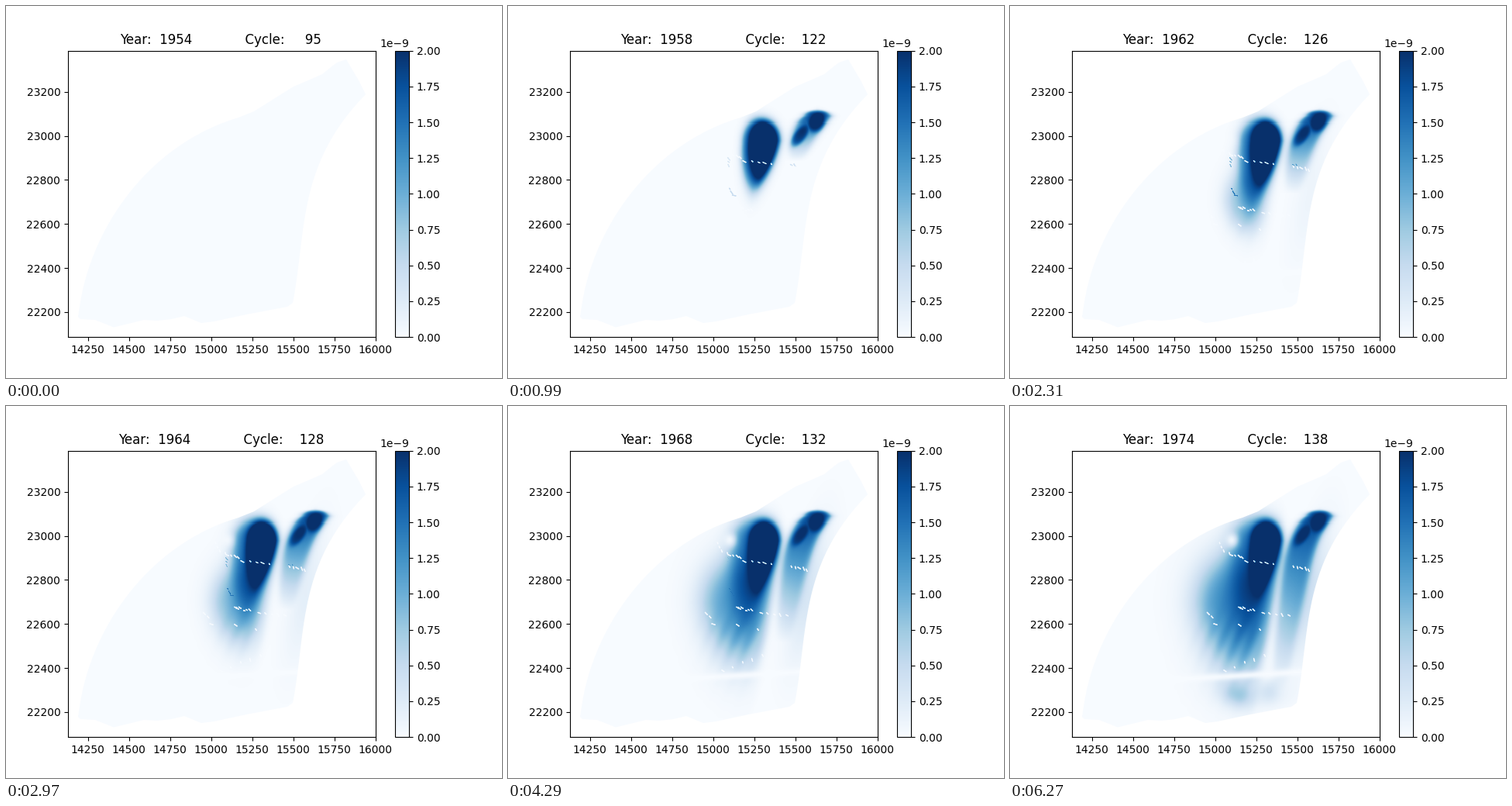
Recreate the animation shown at these times as a matplotlib script. Size 640 by 480 pixels, loop 6600 ms.

```python
import numpy as np
import matplotlib.pyplot as plt
from matplotlib.animation import FuncAnimation
from matplotlib.patches import Polygon

FRAMES, INTERVAL = 20, 330
X0, X1, Y0, Y1 = 14128.2, 16000.2, 22086.3, 23387.3
LEFT, RIGHT, TOP, BOTTOM = 80, 476.8, 57.6, 427.2
SAT = 2.6

# Field sampled on the screen pixels covered by the axes, y down
gx = np.arange(80, 478) + 0.5
gy = np.arange(57, 428) + 0.5
X, Y = np.meshgrid(gx, gy)
rng = np.random.default_rng(4)


def to_data(px, py):
    return (X0 + (px - LEFT) / (RIGHT - LEFT) * (X1 - X0),
            Y1 - (py - TOP) / (BOTTOM - TOP) * (Y1 - Y0))


def bezier(a, b, c, d, n=30):
    t = np.linspace(0, 1, n)[:, None]
    a, b, c, d = map(np.array, (a, b, c, d))
    return list((1 - t) ** 3 * a + 3 * t * (1 - t) ** 2 * b
                + 3 * t * t * (1 - t) * c + t ** 3 * d)


def outline():
    west = bezier((95, 388), (110, 285), (185, 178), (300, 144))
    north = [(320, 136), (371, 104), (390, 96), (408, 88), (418, 80),
             (427, 73), (439, 69), (455, 96)]
    east = bezier((464, 114), (375, 205), (388, 290), (370, 383))
    south = [(363, 388), (310, 398), (268, 407), (252, 409), (230, 400),
             (213, 404), (195, 406), (178, 405), (139, 414.5), (115, 405),
             (96, 404), (93, 401)]
    return west + north + east + south


def sig(v):
    return 1 / (1 + np.exp(-np.clip(v, -40, 40)))


def lerp(a, b, t):
    return a + (b - a) * t


def egg(cx, cy, rx, up, down, lean=0, p=2):
    """Radius measure of an egg whose lower part leans and tapers."""
    dy = Y - cy
    u = np.abs(dy) / np.where(dy < 0, up, down)
    v = np.abs(X - cx - lean * np.maximum(dy, 0)) / rx
    p = np.where(dy < 0, 2, p)
    return (u ** p + v ** p) ** (1 / p)


def polar(cx, cy, rx, ry, tilt):
    """Elliptical radius; the ry axis leans right by tilt degrees."""
    a = np.radians(tilt)
    u = (X - cx) * np.sin(a) - (Y - cy) * np.cos(a)
    v = (X - cx) * np.cos(a) + (Y - cy) * np.sin(a)
    return np.hypot(v / rx, u / ry)


def glow(*ellipse):
    return np.exp(-polar(*ellipse) ** 2)


def dashes(start, end, n):
    """Mask of n short strokes scattered along a line."""
    mask = np.zeros_like(X)
    for t in np.linspace(0, 1, n):
        x, y = lerp(np.array(start), np.array(end), t) + rng.normal(0, .7, 2)
        angle, half = rng.uniform(.2, 1.3), rng.uniform(.6, 2.2)
        c, s = np.cos(angle), np.sin(angle)
        along = np.clip((X - x) * c + (Y - y) * s, -half, half)
        d = np.hypot(X - x - along * c, Y - y - along * s)
        mask = np.maximum(mask, np.exp(-(d / .9) ** 4))
    return mask


def union(*parts):
    rest = 1
    for part in parts:
        rest = rest * (1 - np.clip(part / SAT, 0, 1))
    return SAT * (1 - rest)


GAPS = sum(dashes(*run) for run in [
    ((271, 177), (277, 187), 3), ((283, 190), (299, 197), 5),
    ((306, 200), (340, 204), 5), ((366, 207), (386, 211), 5),
    ((295, 260), (315, 264), 6), ((326, 267), (360, 270), 5),
    ((256, 267), (265, 280), 3), ((277, 341), (328, 322), 5),
    ((297, 283), (322, 289), 2)]).clip(0, 1)
FLECKS = (.9 * dashes((285, 197), (284, 206), 3)
          + 1.5 * dashes((286, 238), (291, 244), 3)
          + 1.2 * dashes((365, 206), (370, 205), 2))
SLIT = 353 - .19 * np.maximum(Y - 195, 0)
WEST_SIDE = sig((SLIT - X) / 3)
STREAKS = 1 + .08 * np.sin((X + .42 * Y) / 3) * sig((Y - 285) / 10)
SEAM = np.exp(-((Y - 349 + (X - 280) * .06) / 5) ** 2)
HOLE = np.exp(-polar(286, 173, 8, 9, 0) ** 2)
HEADS = sig(6 * (1 - np.minimum(polar(398, 151, 9.5, 12, 35),
                                polar(377, 167, 7, 15, 37))))
SHORE = glow(388, 245, 20, 80, 12)
BASIN = (.5 * glow(293, 373, 20, 15, 20) + .26 * glow(335, 368, 14, 16, 10)
         + .12 * glow(318, 372, 46, 18, 0))


def east_plume(length):
    """Slanted plume fading linearly from its head down to its tip."""
    d = np.maximum(Y, 143) - 150
    axis = 393 - 16 * (1 - np.exp(-d / 25)) - .14 * d
    s = np.clip((Y - 140) / length, 0, 1)
    cap = np.sqrt(np.clip(1 - (np.maximum(150 - Y, 0) / 16) ** 2, 0, 1))
    half = 19 * (1 - .6 * s ** 2) * cap
    return (1.85 * (1 - s) * sig((half - np.abs(X - axis)) / 2.6)
            * sig((Y - 136) / 1.2))


def field(k):
    if k == 0:
        return np.zeros_like(X)
    g = (k - 2) / 17
    ease = 1 - (1 - g) ** 2
    late = np.clip((k - 5) / 14, 0, 1)
    spread = 1 - (1 - late) ** 2

    core = 2.4 * sig(8 * (1 - egg(331, 174, 20, 26, lerp(50, 66, ease),
                                  -.14, 1.6)))
    halo = 1.5 * sig(lerp(9, 4.5, ease) * (1 - egg(
        lerp(322, 319, ease), 178, lerp(18, 31, ease), 31,
        lerp(52, 105, ease), -.1, 1.7)))
    south = 1.35 * late ** .3 * sig(4 * (1 - egg(
        lerp(306, 290, spread), lerp(250, 256, spread), lerp(14, 46, spread),
        lerp(25, 58, spread), lerp(20, 80, spread), .08)))
    c = union(core, halo * WEST_SIDE, south * WEST_SIDE * STREAKS,
              east_plume(lerp(50, 228, g)), HEADS * lerp(1.6, 1.1, ease),
              SHORE * .38 * spread, BASIN * np.clip((k - 14) / 5, 0, 1))
    c = c * (1 - .92 * SEAM) * (1 - .9 * HOLE * min(1, 3 * late))
    c = np.maximum(c, FLECKS * np.clip((k - 2) / 3, 0, 1))
    return c * (1 - .9 * GAPS)


def heading(k):
    year = 1955 + k if k else 1954
    cycle = 95 if k == 0 else (118 if k < 3 else 119) + k
    return f"Year:  {year}" + " " * 13 + f"Cycle:{cycle:7d}"


fig, ax = plt.subplots(figsize=(6.4, 4.8), dpi=100)
ex0, ey1 = to_data(gx[0] - .5, gy[0] - .5)
ex1, ey0 = to_data(gx[-1] + .5, gy[-1] + .5)
im = ax.imshow(field(0), cmap="Blues", vmin=0, vmax=2e-9, aspect="auto",
               extent=(ex0, ex1, ey0, ey1), interpolation="nearest")
im.set_clip_path(Polygon([to_data(*p) for p in outline()],
                         transform=ax.transData))
fig.colorbar(im)
ax.set_xlim(X0, X1)
ax.set_ylim(Y0, Y1)
title = ax.set_title(heading(0), x=.4975)


def update(k):
    im.set_data(field(k) * 1e-9)
    title.set_text(heading(k))
    return im, title


anim = FuncAnimation(fig, update, frames=FRAMES, interval=INTERVAL,
                     init_func=lambda: update(0), repeat=True, blit=False)
plt.show()
```
